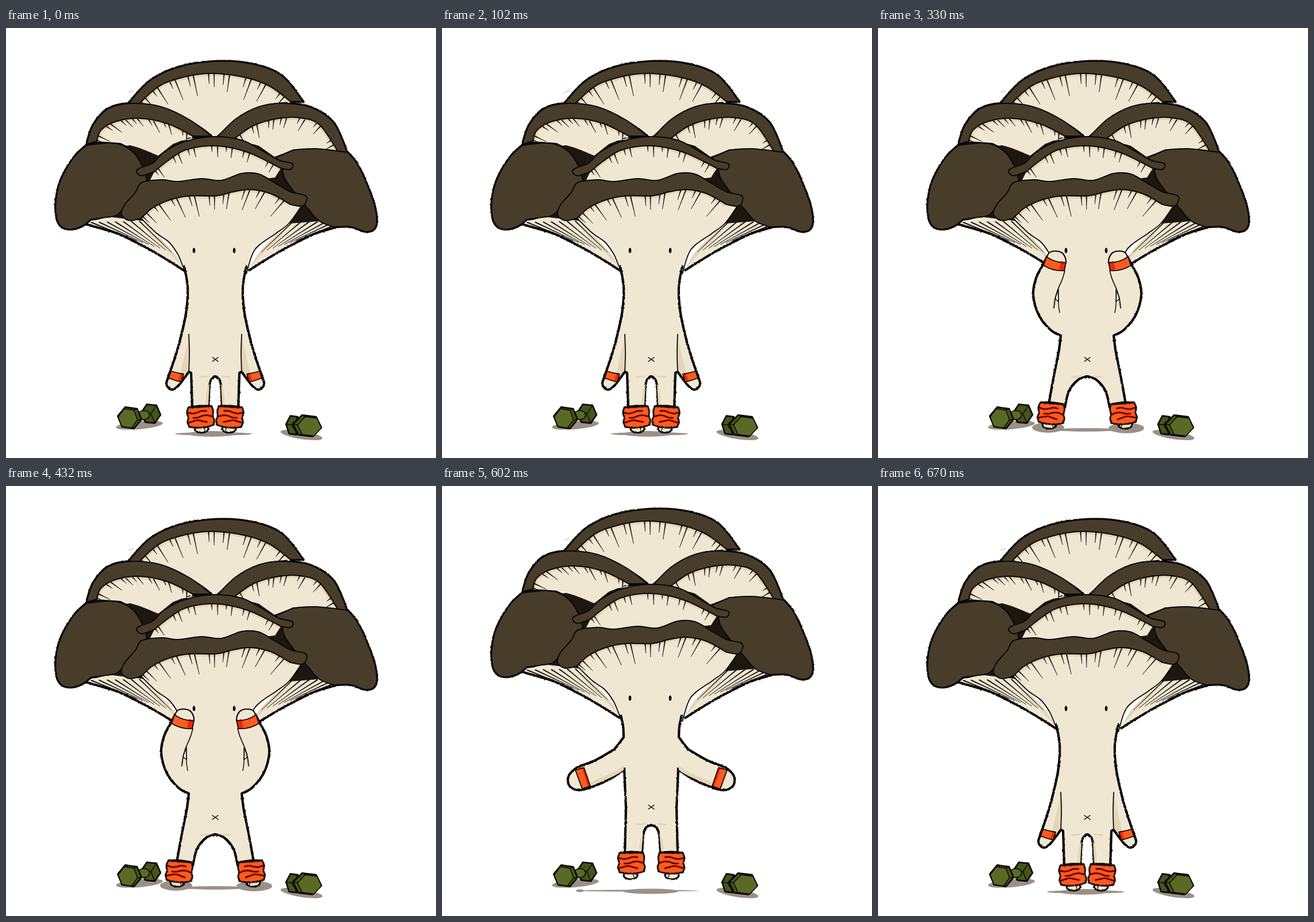
An HTML page for the animation above (0.79 s loop, 748 px wide and 748 px high).

```html
<!DOCTYPE html>
<html lang="en">
<head>
<meta charset="utf-8">
<title>Mushroom workout</title>
<style>
html, body { margin: 0; width: 100%; height: 100%; overflow: hidden; background: #fff; }
svg { display: block; width: 100vw; height: 100vh; }
</style>
</head>
<body>
<svg id="stage" viewBox="0 0 748 748" stroke-linejoin="round"></svg>
<script>
const INK = "#0b0704", DARK = "#483d2b", DEEP = "#1d1710", CREAM = "#f0e7d3", TAN = "#e3d6b6",
  ORANGE = "#ff5b20", RED = "#ee2704", GREEN = "#5a6a26", MOSS = "#46541c", SHADOW = "#9b9089";

const pairs = s => s.trim().split(/\s+/).map(p => p.split(",").map(Number));
const mix = (a, b, t) => [a[0] + (b[0] - a[0]) * t, a[1] + (b[1] - a[1]) * t];
const dist = (a, b) => Math.hypot(b[0] - a[0], b[1] - a[1]);

function seeded(seed) {
  return () => (seed = (seed * 16807) % 2147483647) / 2147483647;
}

// Smooth curve through the points; "|" makes a corner.
function curve(text) {
  let d = "";
  for (const part of text.split("|")) {
    const p = pairs(part);
    d += (d ? "L" : "M") + p[0];
    for (let i = 0; i < p.length - 1; i++) {
      const a = p[i - 1] || p[i], b = p[i], c = p[i + 1], e = p[i + 2] || c;
      d += `C${b[0] + (c[0] - a[0]) / 6},${b[1] + (c[1] - a[1]) / 6} ` +
        `${c[0] - (e[0] - b[0]) / 6},${c[1] - (e[1] - b[1]) / 6} ${c}`;
    }
  }
  return d;
}
const shape = (text, fill, ink = "none", w = 0) =>
  `<path d="${curve(text)}Z" fill="${fill}" stroke="${ink}" stroke-width="${w}"/>`;
const line = (text, w = 1.8, ink = INK) =>
  `<path d="${curve(text)}" fill="none" stroke="${ink}" stroke-width="${w}"/>`;
const poly = (points, fill, w = 2) =>
  `<polygon points="${points.join(" ")}" fill="${fill}" stroke="${INK}" stroke-width="${w}"/>`;
const oval = (x, y, rx, ry, fill, w = 0, turn = 0) =>
  `<ellipse transform="translate(${x} ${y}) rotate(${turn})" rx="${rx}" ry="${ry}" fill="${fill}" stroke="${INK}" stroke-width="${w}"/>`;
const rough = s => `<g filter="url(#rough)">${s}</g>`;
const both = (s, axis = 364) => s + `<g transform="translate(${2 * axis} 0) scale(-1 1)">${s}</g>`;

// One tapered stroke, thick at a and fine at b.
function taper(a, b) {
  const k = .8 / dist(a, b), nx = (a[1] - b[1]) * k, ny = (b[0] - a[0]) * k;
  return `<path d="M${a[0] + nx},${a[1] + ny}L${b}L${a[0] - nx},${a[1] - ny}Z" fill="${INK}" stroke="${INK}" stroke-width=".5"/>`;
}

function along(points, t) {
  const part = points.slice(1).map((p, i) => dist(points[i], p));
  let left = t * part.reduce((a, b) => a + b);
  const i = part.findIndex(l => (left -= l) <= 0);
  return mix(points[i], points[i + 1], 1 + left / part[i]);
}

// Gills hang from the rim in pairs, a long and a short one, aimed at a focus.
function gills(rim, focus, count, size) {
  const points = pairs(rim), rand = seeded(count * 977 + size);
  let s = "";
  for (let i = 0; i < count; i++) {
    const t = (i + .4 + rand() * .4) / count;
    [size * (.7 + rand() * .5), size * (.3 + rand() * .3)].forEach((len, j) => {
      const a = along(points, Math.min(t + j * 6 / (count * 20), .99));
      s += taper(a, mix(a, focus, len / dist(a, focus)));
    });
  }
  return s;
}

function cap({ outer, inner, floor, focus, count, size }) {
  return shape(inner + "|" + floor, CREAM) + line(inner, 9, TAN) + gills(inner, focus, count, size) +
    shape(outer + "|" + inner, DARK, INK, 2);
}

const top_ = {
  outer: "213,131 250,92 300,68 365,58 430,63 480,83 517,128",
  inner: "495,128 460,102 420,87 363,79 320,83 270,99 232,131",
  floor: "270,137 320,160 365,189|410,152 450,134 495,128",
  focus: [363, 260], count: 9, size: 32
};
const midL = {
  outer: "140,202 152,168 178,140 220,131 270,137 320,160 357,188",
  inner: "325,188 280,166 230,157 190,163 165,178 158,197",
  floor: "200,200 230,208 265,222|290,202 325,188",
  focus: [310, 260], count: 7, size: 22
};
const midR = {
  outer: "368,189 400,158 440,137 480,131 530,138 570,165 594,218",
  inner: "577,214 545,168 510,156 470,158 430,170 398,192",
  floor: "440,205 467,224|500,212 540,210 577,214",
  focus: [455, 270], count: 7, size: 22
};
const middle = {
  outer: "258,250 236,257 227,250 232,244 255,235 275,216 310,198 360,189 410,195 450,216 475,230 498,236 495,246 478,244",
  inner: "478,244 455,232 425,218 390,208 352,205 310,213 280,232 258,250",
  floor: "250,266 360,272 468,260",
  focus: [370, 400], count: 7, size: 20
};
const front = {
  outer: "235,331 215,335 201,325 206,308 225,286 236,269 270,264 300,267 340,262 375,265 410,253 440,254 470,271 495,285 520,291 523,300 515,310 495,307",
  inner: "495,307 460,288 425,281 395,285 365,292 320,292 285,299 255,313 235,331",
  focus: [363, 440], count: 9, size: 32
};
const fanL = "235,331 262,357 283,372 298,392 306,410 313,428";
const fanR = "418,428 428,395 440,378 470,357 492,340 513,311";
front.floor = fanL + "|" + fanR;

const sideL = "140,204 118,225 95,265 87,300 88,330 97,346 115,350 135,343 147,333|170,330 195,324 215,298 245,265|240,245 225,220 205,205 180,200 140,204";
const sideR = "594,216 610,235 625,265 640,305 645,335 640,350 625,354 605,347 594,345|570,346 545,336 525,314 505,290 485,262 480,240|470,225|500,212 540,210 594,216";
const hem = "138,341 170,350 200,360 240,380 275,400 310,422";

function skirt() {
  let s = shape(hem + "|313,430|240,320 190,325 138,341", CREAM) + shape("243,350 270,368 293,392 309,419|285,392 258,366", TAN);
  for (let i = 0; i < 7; i++) {
    s += taper(mix([148, 338], [232, 336], i / 6), mix([228, 370], [288, 390], i / 6));
  }
  return s + rough(line(hem, 4.2));
}

function head() {
  const edges = [top_, midL, midR].map(c => c.outer).concat(sideL, sideR);
  return line("213,112 222,109", 1, "#aaa") +
    rough(edges.map(e => shape(e, DEEP, INK, 4.6)).join("")) +
    both(skirt(), 366) +
    shape("205,205|365,190|500,215|545,336|365,350|175,328", DEEP) +
    cap(top_) + cap(midL) + cap(midR) +
    shape(sideL, DARK, INK, 2) + shape(sideR, DARK, INK, 2) +
    cap(middle) + cap(front) + line(fanL) + line(fanR);
}

function cuff(text, bx, by) {
  const [a, b, c, d] = pairs(text);
  const bend = (p, q) => mix(p, q, .5).map((v, i) => v + [bx, by][i]);
  const path = `M${a}Q${bend(a, b)} ${b}L${c}Q${bend(c, d)} ${d}Z`;
  return `<path d="${path}" fill="${ORANGE}"/>` +
    `<polygon points="${[mix(a, b, .75), b, c, mix(d, c, .75)].join(" ")}" fill="${RED}"/>` +
    `<path d="${path}" fill="none" stroke="${INK}" stroke-width="1.8"/>`;
}

function warmer(x, y, turn) {
  const edge = "-20,-17 0,-19 21,-17|23,-8 22,0 24,8 22,16|8,19 -8,19 -20,17|-23,9 -21,0 -23,-8 -20,-17";
  let folds = "";
  for (let i = 0; i < 3; i++) {
    const from = i % 2 ? -12 : -21, pts = [];
    for (let k = 0; k < 5; k++) pts.push([from + k * 8, -8 + i * 8 + 2 * Math.sin(k * 1.4 + i)]);
    const text = pts.join(" ");
    folds += line(text, 4, RED) + line(text, 1.6);
  }
  return `<g transform="translate(${x} ${y}) rotate(${turn})">` +
    shape(edge, ORANGE) + folds + rough(line(edge + "|21,-17", 2.8)) + "</g>";
}

// Left half of the body from neck to crotch; the right half mirrors it.
function half(edge, crotch) {
  return shape(`${edge}|366,${crotch}|366,400`, CREAM) + rough(line(edge, 4.2));
}
const foot = (x, y) => rough(oval(x, y, 12, 7, CREAM, 3)) + line(`${x - 3},${y - 4} ${x + 4},${y - 2} ${x + 6},${y + 3}`, 1.3);

const face = both(oval(327, 387, 2.3, 4.5, INK), 362) + both(line("359,573 369,580", 1.5)) + both(line("338,607 352,606", 3, TAN));
const dark = (...a) => oval(...a, SHADOW);

const poses = {
  stand: {
    dy: 0,
    shadow: dark(361, 706, 67, 3) + dark(358, 706, 42, 5),
    draw: () => foot(340, 697) +
      half("310,415 316,450 314,490 306,530 295,570 283,605 279,620 288,629 300,622 318,598|322,600 324,662|352,662 354,622 358,610 364,606", 606) +
      shape("318,540 308,580 304,602 317,597", TAN) + shape("354,618 349,632 348,655 352,655", TAN) +
      line("318,533 319,565 318,600") + cuff("287,597 309,602 305,616 283,609", 1, 1) + warmer(338, 676, -3)
  },
  jump: {
    dy: -18,
    shadow: dark(340, 704, 107, 1.5) + dark(363, 705, 48, 4.5) + dark(240, 704, 7, 2.5),
    draw: () => foot(328, 677) +
      half("311,399 315,418 316,437|300,458 265,478 235,490 220,505 222,522 240,529 270,520 300,505 317,492|320,560 318,642|348,642 350,608 355,594 364,590", 590) +
      shape("317,486 295,499 260,515 260,521 300,504 316,494", TAN) + shape("350,602 345,615 343,638 347,638", TAN) +
      cuff("232,494 247,490 258,522 244,527", 1, -1).replace("rotate", "rotate") + warmer(329, 655, 0)
  },
  crouch: {
    dy: 0,
    shadow: dark(296, 695, 28, 9) + dark(432, 696, 31, 9) + dark(363, 699, 60, 3),
    draw: () => foot(298, 690) +
      half("294,398 288,410 275,435 270,465 280,500 300,525 318,535|315,560 305,610 296,660|325,660 332,632 348,612 364,606", 606) +
      shape("322,424 313,450 306,470 304,490 311,478 314,452", TAN) +
      shape("313,455 308,471|314,476", "#fff", INK, 1.4) +
      line("325,422 321,436 313,455 308,472 306,487", 1.6) + line("314,455 314,480 316,495", 1.4) +
      shape("293,400 298,391 308,388 320,391 326,400 327,408|310,412", CREAM) + line("293,400 298,391 308,388 320,391 326,400 327,408", 2.2) +
      cuff("293,398 327,408 324,422 288,413", -1, 6) + warmer(301, 670, 5)
  }
};

function hexagon(x, y, rx, ry, turn) {
  return Array.from({ length: 6 }, (_, i) => {
    const a = turn + i * Math.PI / 3;
    return [x + rx * Math.cos(a), y + ry * Math.sin(a)];
  });
}

// Near end at x,y with its face shifted by lean; far end at u,v.
function dumbbell(x, y, r, lean, u, v, far) {
  const rim = hexagon(x, y, r, 20, .15), plate = hexagon(x + lean, y + 1, r - 4, 18, .15);
  const back = hexagon(u, v, far, 18, .1);
  return poly(back, MOSS, 2.6) + back.filter((_, i) => i % 2).map(p => line(`${p} ${u},${v}`, 1.5)).join("") +
    oval((x + 2 * u) / 3, (y + 2 * v) / 3, 10, 8, GREEN, 1.6) +
    poly(rim, MOSS, 2.6) + poly(plate, GREEN, 1.5) +
    rim.map((p, i) => line(`${p} ${plate[i]}`, 1.4)).join("");
}

const stage = document.getElementById("stage");
const names = Object.keys(poses);
stage.innerHTML = `<defs><filter id="rough" filterUnits="userSpaceOnUse" x="-50" y="-50" width="850" height="850" color-interpolation-filters="sRGB">
  <feTurbulence type="fractalNoise" baseFrequency=".3" numOctaves="2" seed="4" result="n"/>
  <feDisplacementMap in="SourceGraphic" in2="n" scale="2.6" xChannelSelector="R" yChannelSelector="G"/></filter></defs>
  <rect width="748" height="748" fill="#fff"/>` +
  oval(232, 691, 41, 7, SHADOW, 0, -5) + oval(514, 708, 37, 7, SHADOW, 0, 9) +
  names.map(n => `<g id="${n}-shadow">${poses[n].shadow}</g>`).join("") +
  dumbbell(215, 678, 21, -3, 252, 671, 17) + dumbbell(524, 692, 25, 4, 500, 691, 13) +
  `<g id="head" stroke-linecap="butt">${head()}</g><g stroke-linecap="round">` +
  names.map(n => `<g id="${n}">${both(poses[n].draw())}</g>`).join("") + `<g id="face">${face}</g></g>`;

const find = id => document.getElementById(id);
const steps = [[170, "stand"], [330, "jump"], [500, "crouch"], [670, "jump"], [790, "stand"]];
let shown = "";

function render(ms) {
  const name = steps.find(s => ms % 790 < s[0])[1];
  if (name === shown) return;
  shown = name;
  for (const n of names) {
    for (const id of [n, n + "-shadow"]) find(id).setAttribute("visibility", n === name ? "visible" : "hidden");
  }
  for (const id of ["head", "face"]) find(id).setAttribute("transform", `translate(0 ${poses[name].dy})`);
}

const start = performance.now();
function tick() {
  render(performance.now() - start);
  requestAnimationFrame(tick);
}
tick();
</script>
</body>
</html>
```
